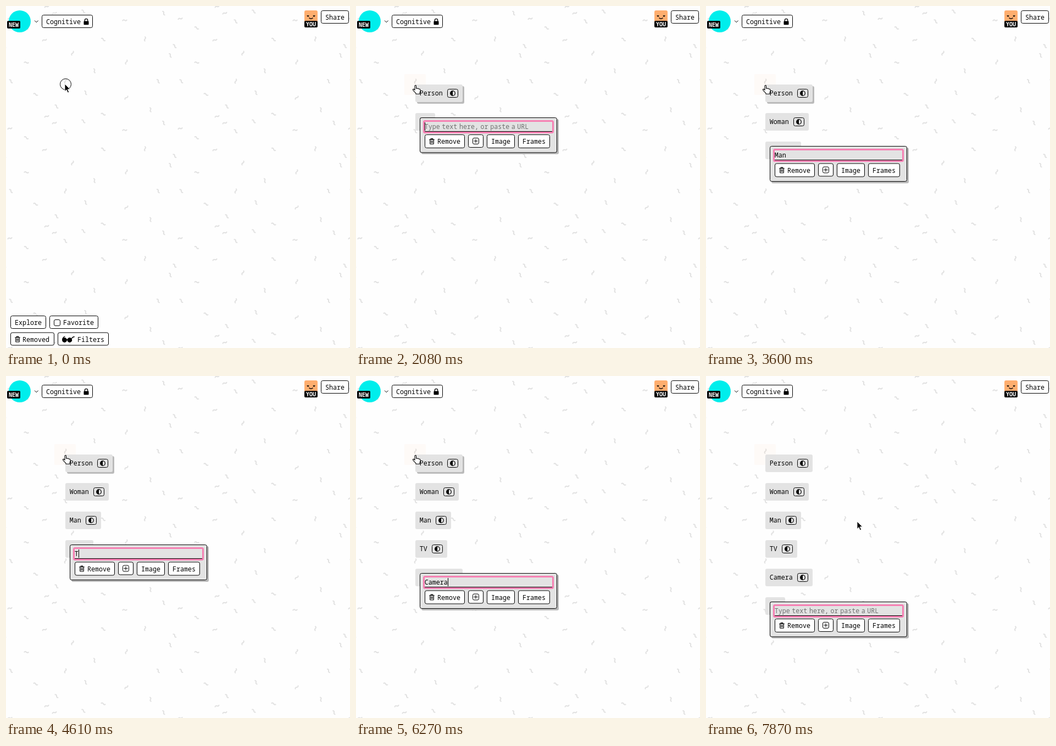
Write an HTML page that moves like this. It is 626 px wide and 623 px high and loops after 7.99 s.

```html
<!DOCTYPE html>
<html lang="en">
<head>
<meta charset="utf-8">
<title>Cognitive</title>
<style>
html, body { margin: 0; width: 100%; height: 100%; overflow: hidden; background: #fefefe; }
svg { display: block; }
text { font: 500 11.7px "Noto Sans Mono", "DejaVu Sans Mono", monospace; white-space: pre; }
.tag { font-size: 10px; font-weight: 700; fill: #fff; }
.hint { fill: #6f6f6f; word-spacing: -3.45px; }
.box { fill: #fff; stroke: #000; }
.line { fill: none; stroke: #000; }
.grey { fill: #e3e3e3; }
.shade { fill: #bababa; }
</style>
</head>
<body>
<svg id="stage" width="626" height="623" viewBox="0 0 626 623"></svg>
<script>
const LOOP = 7990;
const CARD_X = 108, CARD_Y = 143, ROW = 52;

// word, time its editor opens, time of each letter
const CARDS = [
  ["Person", 905, [1500, 1590, 1670, 1760, 1850, 1850]],
  ["Woman", 2080, [2440, 2540, 2620, 2700, 2780]],
  ["Man", 3070, [3250, 3430, 3600]],
  ["TV", 3720, [4610, 4790]],
  ["Camera", 5140, [5430, 5670, 5970, 6150, 6210, 6270]],
  ["", 6810, []]
];
const CARET_OFF = [[1440, 1500], [3600, 3720], [4310, 4610], [7470, LOOP]];

// x, y, angle of the confetti in one 310 x 200 tile
const CONFETTI = [
  [88, 13, -25], [141, 10, 40], [177, 61, 30], [253, 60, 90], [70, 62, -25],
  [121, 86, -70], [307, 73, 45], [299, 90, 60], [37, 103, 0], [219, 102, -75],
  [161, 118, 70], [9, 137, 45], [108, 137, -80], [277, 137, 55], [145, 158, 60],
  [54, 161, 20], [219, 167, -50], [92, 183, 45], [263, 189, 75], [177, 197, 15],
  [287, 13, 60], [74, 1, -25], [7, 23, -20], [216, 26, -10], [37, 40, 25], [108, 28, 45]
];

const rect = (x, y, w, h, r, cls, extra = "") =>
  `<rect x="${x}" y="${y}" width="${w}" height="${h}" rx="${r}" class="${cls}" ${extra}/>`;
const text = (x, y, s, cls = "") => `<text x="${x}" y="${y}" class="${cls}">${s}</text>`;
const button = (x, y, w, label, tx, h = 23) =>
  rect(x + .5, y + .5, w, h, 3, "box") + (label ? text(tx, y + 17, label) : "");
const at = (x, y, body) => `<g transform="translate(${x} ${y})">${body}</g>`;

const trash = (x, y) => at(x, y, `
  <path class="line" stroke-width="1.2" d="M0 2.4H9.4M3 2V.7H6.4V2"/>
  <path class="line" stroke-width="1.2" d="M1.4 3V9.6Q1.4 10.5 2.3 10.5H7.1Q8 10.5 8 9.6V3M3.6 4.3V8.8M5.8 4.3V8.8"/>`);

const tile = CONFETTI.map(([x, y, a]) =>
  `<path d="M-4.2 .6Q-2.4-2.4 0 0T4.2-.4" transform="translate(${x} ${y}) rotate(${a})"/>`).join("");

function wallpaper() {
  let out = `<defs><g id="tile" fill="none" stroke="#e1e1e1" stroke-width="2">${tile}</g></defs>`;
  for (let y = 0; y < 800; y += 200)
    for (let x = -310; x < 626; x += 310) out += `<use href="#tile" x="${x}" y="${y}"/>`;
  return out;
}

const header = `
  <circle cx="25" cy="28" r="20" fill="#00eeec"/>
  ${rect(2, 27, 24, 14, 2, "")}${text(5, 37.6, "NEW", "tag")}
  <path class="line" d="M52 26.5l3.3 3.3 3.3-3.3"/>
  ${button(65, 16, 92, "Cognitive", 73)}
  ${rect(141.5, 27.5, 9, 6.8, 1, "")}
  <path class="line" stroke-width="1.3" d="M143.3 28V26a2.7 2.7 0 0 1 5.4 0V28"/>
  ${rect(543, 8, 24, 31, 3, "", 'fill="#ffae6f"')}
  <path d="M547.3 17.3h4v2h-3zM558.8 17.3h4l-1 2h-3z"/>
  <path class="line" stroke-width="1.3" d="M551.5 21.5Q555 25 558.5 21.5"/>
  ${rect(543, 27, 24, 12, 2, "")}${text(546, 36.8, "YOU", "tag")}
  ${button(573, 8, 50, "Share", 581)}`;

const footer = `
  ${button(8, 564, 64, "Explore", 16)}
  ${button(79, 564, 88, "Favorite", 104)}
  ${rect(87.5, 571.5, 11, 11, 2.5, "box")}
  ${button(8, 594.5, 79, "Removed", 30)}${trash(16.3, 601.5)}
  ${button(94, 594.5, 92, "Filters", 130)}
  <circle cx="106.5" cy="608.5" r="4.4"/><circle cx="115.8" cy="608.5" r="4.4"/>
  <path class="line" stroke-width="1.3" d="M102.5 607.5Q104 602.5 107.5 601.8M110 607.5h3M119 606.5Q121 602.5 124.8 602.5"/>`;

const cardMarkup = (c, i) => `<g id="card${i}" transform="translate(${CARD_X} ${CARD_Y + i * ROW})">
  ${rect(3, 3, 36, 32, 3, "shade")}${rect(0, 0, 36, 32, 3, "grey")}
  ${text(7.7, 20.2, "")}
  <g class="join">${rect(.5, 8.5, 19, 15, 3, "line")}
    <circle cx="10" cy="16" r="4.3" class="line" stroke-width="1.2"/>
    <path d="M10 11.7a4.3 4.3 0 0 0 0 8.6z"/></g></g>`;

const panel = `<g id="panel">
  <rect id="drop" x="3" y="3" width="250" height="64" rx="3" class="shade"/>
  <rect id="frame" x=".5" y=".5" width="249" height="63.5" rx="3" fill="#e3e3e3" stroke="#000"/>
  ${rect(7.5, 6.5, 235, 21, 2, "", 'fill="none" stroke="#f680b3" stroke-width="3"')}
  <path class="line" d="M9 25.5H241"/>
  ${text(8.7, 21, "Type text here, or paste a URL", "hint")}
  <text id="typed" x="8.7" y="21"></text>
  <rect id="caret" y="9" width="1" height="15"/>
  <g id="tools">
    ${button(9, 31, 72, "Remove", 32, 24)}${trash(17.3, 38)}
    ${button(88, 31, 27)}
    ${rect(96.5, 37.5, 11, 11, 2.5, "line")}<path class="line" d="M102 39.5v7M98.5 43h7"/>
    ${button(122, 31, 50, "Image", 130, 24)}
    ${button(179, 31, 57, "Frames", 187, 24)}
  </g></g>`;

const stage = document.getElementById("stage");
stage.innerHTML = `
  ${wallpaper()}
  <circle id="paint" cx="108" cy="143" r="20" fill="#ffae6f"/>
  ${rect(88, 124, 39, 38, 2, "", 'id="tint" fill="#ffae6f" opacity=".05"')}
  ${header}<g id="footer">${footer}</g>
  ${CARDS.map(cardMarkup).join("")}
  ${panel}
  <circle id="ring" cx="108.5" cy="142.5" r="10" class="line"/>
  <g id="cursor">
    <path id="arrow" fill="#000" stroke="#fff" stroke-width=".9"
      d="M0 0V13.6L3.1 10.7 5.4 16 7.7 15 5.4 9.8H9.7Z"/>
    <path id="hand" fill="#fff" stroke="#000" stroke-width="1.1" stroke-linejoin="round"
      d="M0 10.3V3.8Q0 2.3 1.2 2.3T2.5 3.8V8.3Q4.6 7 5 8.6 7 7.6 7.5 9.3 10 8.8 10 10.8V12.8Q10 14.8 9 15.8V18.3H2V16.8L-2 12.8Q-4.5 10.2-3 9.5T0 11.3Z"/>
  </g>`;

const el = id => document.getElementById(id);
const show = (node, on) => node.setAttribute("display", on ? "inline" : "none");
const move = (node, x, y) => node.setAttribute("transform", `translate(${x} ${y})`);
const within = (t, a, b) => t >= a && t < b;
const typedAt = (i, t) => CARDS[i][0].slice(0, CARDS[i][2].filter(k => t >= k).length);
const cardWidth = s => s ? Math.round(43.6 + 7.05 * s.length) : 36;

function pointer(t) {
  if (t < 7400) return [107, 142];
  const p = Math.min(1, (Math.floor((t - 7400) / 58.7) + 1) / 9);
  const e = p * p * (3 - 2 * p), q = 1 - e;
  const bend = (a, b, c) => q * q * a + 2 * q * e * b + e * e * c;
  return [bend(107, 200, 275), bend(142, 105, 265)];
}

function drawCard(i, t, hover) {
  const g = el("card" + i), open = t >= CARDS[i][1];
  show(g, open);
  if (!open) return;
  const word = typedAt(i, t), w = cardWidth(word);
  const [shadow, body] = g.querySelectorAll(":scope > rect");
  shadow.setAttribute("width", w);
  body.setAttribute("width", w);
  show(shadow, hover);
  g.querySelector("text").textContent = word;
  move(g.querySelector(".join"), w - 28, 0);
}

function drawPanel(t) {
  const row = CARDS.filter(c => t >= c[1]).length - 1;
  show(el("panel"), row >= 0);
  show(el("footer"), row < 0);
  if (row < 0) return;
  const word = typedAt(row, t), grow = word ? .5 : 0;
  move(el("panel"), CARD_X + 8, CARD_Y + 8 + row * ROW);
  move(el("tools"), 0, grow);
  el("frame").setAttribute("height", 63.5 + grow);
  el("drop").setAttribute("height", 64 + 2 * grow);
  el("typed").textContent = word;
  show(stage.querySelector(".hint"), !word);
  el("caret").setAttribute("x", Math.round(9 + 7.02 * word.length));
  show(el("caret"), !CARET_OFF.some(([a, b]) => within(t, a, b)));
}

function draw(t) {
  const [x, y] = pointer(t);
  const hover = t >= 905 && within(x, 105, 195) && within(y, 140, 176);
  CARDS.forEach((c, i) => drawCard(i, t, i === 0 && hover));
  drawPanel(t);

  const fade = 1 - Math.floor((t - 830) / 75) * 75 / 880;
  show(el("paint"), within(t, 830, 1850));
  el("paint").setAttribute("opacity", Math.max(.05, Math.min(1, fade)));
  show(el("tint"), t >= 1850);

  show(el("ring"), t < 60 || within(t, 290, 350));
  show(el("arrow"), !hover);
  show(el("hand"), hover);
  move(el("cursor"), x, y);
}

function tick() {
  draw(performance.now() % LOOP);
  requestAnimationFrame(tick);
}
tick();
</script>
</body>
</html>
```
